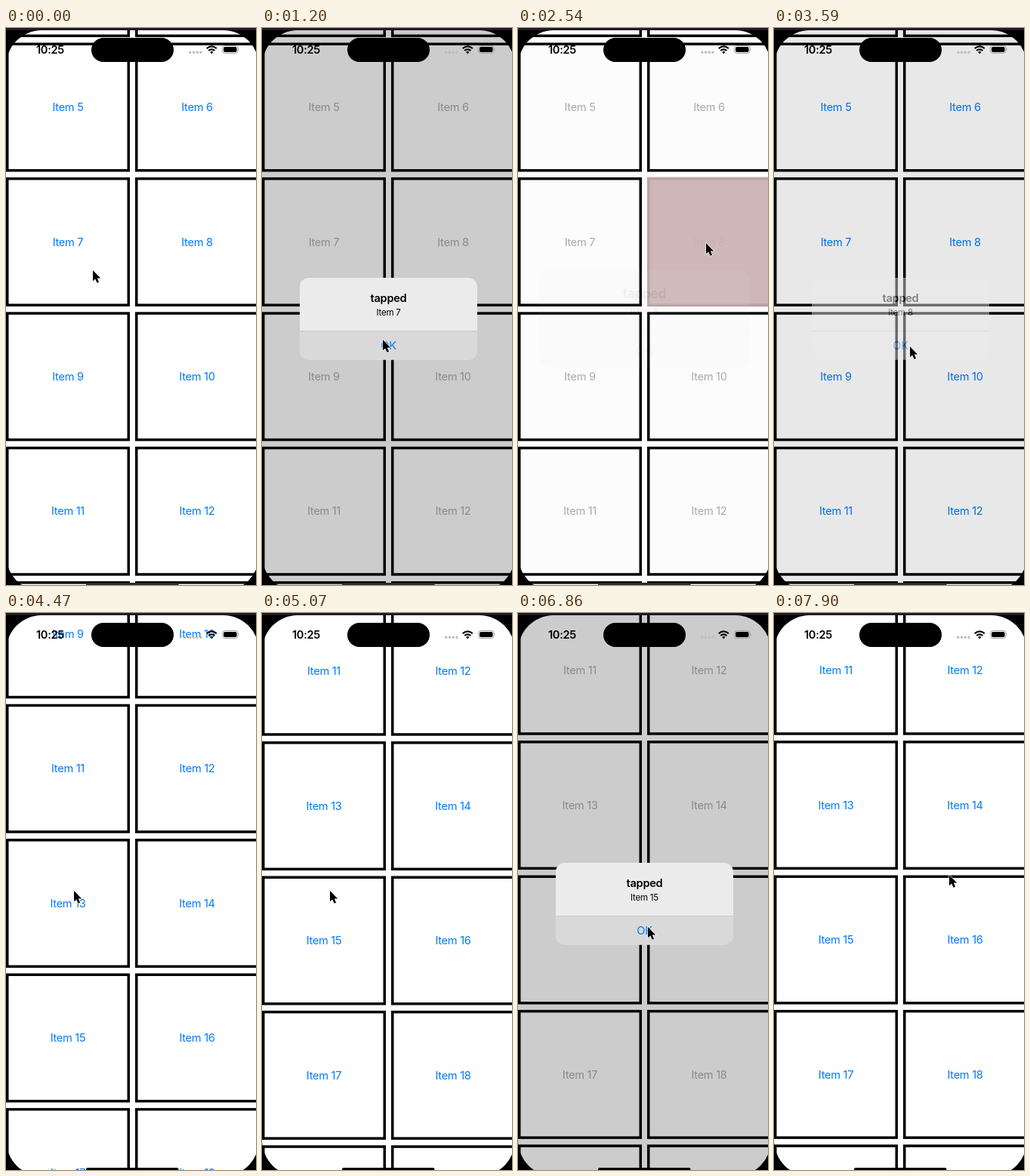
These frames come from a looping animation (331x738 px, 8000 ms). An HTML page:

```html
<!DOCTYPE html>
<html lang="en">
<head>
<meta charset="utf-8">
<title>Tappable grid</title>
<style>
  html, body { margin: 0; width: 100%; height: 100%; overflow: hidden; background: #000; }
  svg { display: block; width: 331px; height: 738px; }
  text { font: 14.6px Inter, sans-serif; letter-spacing: -.02em; text-anchor: middle; }
  .cell rect { fill: #fff; stroke: #000; stroke-width: 3.5; }
  .cell text, .ok { fill: #007aff; }
  .muted .cell text { fill: #acacac; }
  .bold { font-weight: 600; }
  .small { font-size: 11.5px; }
</style>
</head>
<body>
<svg viewBox="0 0 331 738">
  <rect width="331" height="738" fill="#fff"/>
  <g id="grid"></g>
  <rect id="dim" width="331" height="738"/>

  <g id="alert">
    <clipPath id="card"><rect x="50" y="331" width="235" height="108.5" rx="12"/></clipPath>
    <g clip-path="url(#card)">
      <rect x="50" y="331" width="235" height="109" fill="#ebebeb"/>
      <rect id="button" x="50" y="401" width="235" height="39"/>
      <rect x="50" y="401" width="235" height=".8" fill="#c8c8c8"/>
    </g>
    <text class="bold" x="167.5" y="362.5">tapped</text>
    <text class="small" id="message" x="167.5" y="380.5"></text>
    <text class="ok" x="167.5" y="426.3">OK</text>
  </g>

  <path fill-rule="evenodd" d="M0 0H331V738H0ZM47 3H288A47 48 0 0 1 335 51V698A47 48 0 0 1 288 746H47A47 48 0 0 1 0 698V51A47 48 0 0 1 47 3Z"/>
  <rect width="331" height="3" fill="#1f1a26"/>
  <rect x="113" y="13" width="109" height="32" rx="16"/>
  <text class="bold" x="58.5" y="34">10:25</text>
  <path d="M243.8 32.3H259" stroke="#bdbdbd" stroke-width="3.6" stroke-linecap="round" stroke-dasharray="0 4.7"/>
  <g fill="none" stroke="#000" stroke-width="2.2">
    <path d="M265.8 27.2Q272.3 21.6 278.8 27.2"/>
    <path d="M268.2 30Q272.3 26.6 276.4 30"/>
  </g>
  <path d="M270 31.8Q272.3 30 274.6 31.8L272.3 34.2Z"/>
  <rect x="286.5" y="23.5" width="20.5" height="10" rx="3.2" fill="none" stroke="#a0a0a0"/>
  <rect x="288" y="25" width="17.5" height="7" rx="2"/>
  <path d="M308.3 26.8Q310 28.5 308.3 30.2Z" fill="#a0a0a0"/>
  <rect id="home" x="106" y="735" width="122.5" height="4.5" rx="2.2"/>

  <path id="cursor" d="M0 0V14.3L3.2 11.4L5.6 16.8L8.1 15.7L5.8 10.5H10.2Z" stroke="#fff" stroke-width="1.2" paint-order="stroke"/>
</svg>

<script>
const $ = id => document.getElementById(id);
const LOOP = 8000, PITCH = 178.4;

const shortTicks = [16, 25, 30, 37, 50];
const tickStart = k => 150 * k - 10 * shortTicks.filter(s => k >= s).length;

const taps = [
  { item: 7, open: 1, press: 8, close: 12, first: .1 },
  { item: 8, open: 17, press: 23, close: 24, first: .06 },
  { item: 15, open: 40, press: 46, close: 47, first: .35 }
];

// [tick, x, y]
const cursorPath = [
  [0, 115, 321], [5, 115, 321], [6, 128, 345], [7, 150, 395], [8, 160, 413], [11, 160, 413],
  [12, 165, 415], [13, 195, 375], [14, 232, 308], [15, 249, 285], [19, 249, 285],
  [20, 240, 320], [21, 205, 390], [22, 183, 420], [23, 180, 422], [24, 180, 422],
  [25, 140, 405], [26, 90, 368], [34, 90, 368], [39, 83, 434], [41, 83, 434],
  [45, 172, 416], [47, 172, 416], [53, 232, 347]
];

// [tick, offset]
const scrollPath = [
  [0, 0], [26, 0], [27, 60], [28, 190], [29, 325], [30, 434], [31, 552],
  [32, 558], [33, 561], [34, 563], [36, 564], [53, 564]
];

function sample(track, k, field = 1) {
  const i = Math.max(1, track.findIndex(key => key[0] >= k));
  const a = track[i - 1], b = track[i];
  return a[field] + (b[field] - a[field]) * (k - a[0]) / (b[0] - a[0]);
}

const cellX = item => item % 2 ? 0 : 171;
const cellY = item => 19.5 + PITCH * (Math.ceil(item / 2) - 3);

let cells = '';
for (let item = 3; item <= 20; item++) {
  cells += `<g class="cell" transform="translate(${cellX(item)} ${cellY(item)})">
    <rect x="1.75" y="1.75" width="160.5" height="167.5"/>
    <text x="82" y="90.8">Item ${item}</text></g>`;
}
$('grid').innerHTML = cells + '<rect id="flash" width="164" height="171" fill="#cfb3b3"/>';

function draw(k) {
  const tap = taps.findLast(t => k >= t.open) || taps[0];
  const age = k - tap.open, closing = k >= tap.close;
  let shown = 0;
  if (closing) shown = [.45, .08][k - tap.close] || 0;
  else if (age >= 0) shown = age > 3 ? 1 : 1 - (1 - tap.first) * .3 ** age;

  const scroll = sample(scrollPath, k);
  $('grid').setAttribute('transform', `translate(0 ${-scroll})`);
  $('grid').setAttribute('class', age >= 0 && !closing ? 'muted' : '');
  $('flash').setAttribute('transform', `translate(${cellX(tap.item)} ${cellY(tap.item)})`);
  $('flash').setAttribute('opacity', age < 0 ? 0 : .92 * Math.max(0, 1 - age * .45));

  const scale = closing ? 1 : 1.2 - .2 * shown;
  $('dim').setAttribute('opacity', .2 * shown);
  $('alert').setAttribute('opacity', shown);
  $('alert').setAttribute('transform', `translate(167.5 385.3) scale(${scale}) translate(-167.5 -385.3)`);
  $('message').textContent = 'Item ' + tap.item;
  $('button').setAttribute('fill', k >= tap.press && !closing ? '#d9d9d9' : '#ebebeb');

  $('home').setAttribute('fill', scroll ? '#000' : '#2c2c2c');
  $('cursor').setAttribute('transform', `translate(${sample(cursorPath, k, 1)} ${sample(cursorPath, k, 2)})`);
}

function frame() {
  const time = performance.now() % LOOP;
  let k = 53;
  while (tickStart(k) > time) k--;
  draw(k);
  requestAnimationFrame(frame);
}
frame();
</script>
</body>
</html>
```
